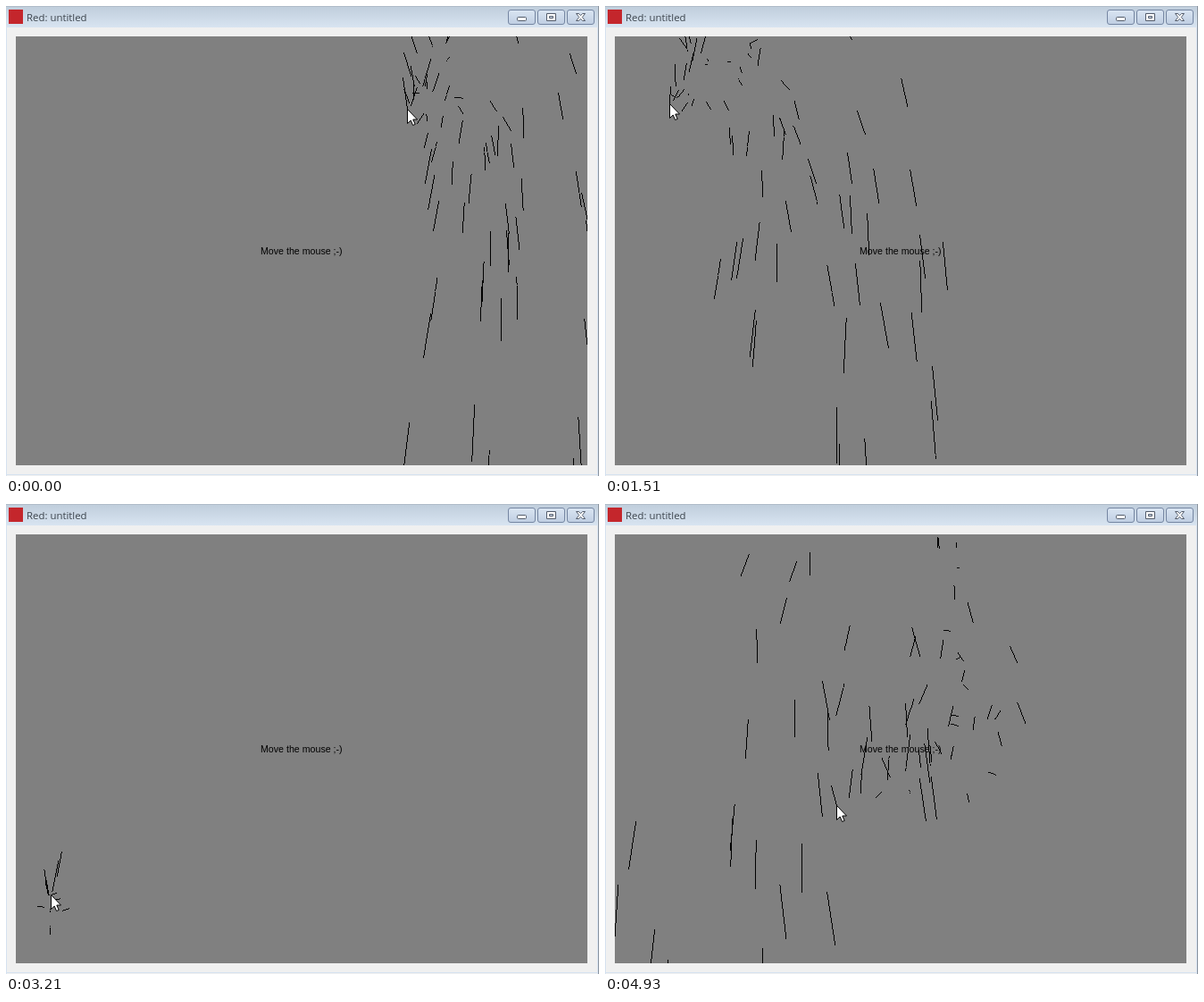
An HTML page with a canvas that plays this animation: 664 px wide and 526 px high, repeating every 5.03 s.

```html
<!DOCTYPE html>
<html lang="en">
<head>
<meta charset="utf-8">
<title>Red: untitled</title>
<style>
html, body { margin: 0; width: 100%; height: 100%; overflow: hidden; background: #f0f0f0; }
#stage { position: absolute; left: 0; top: 0; width: 664px; height: 526px; overflow: hidden; }
svg, canvas { position: absolute; display: block; }
svg { left: 0; top: 0; }
canvas { left: 11px; top: 34px; background: #808080; }
.title { font: 11.4px "Open Sans", "Noto Sans", sans-serif; fill: #3c444d; }
.hint { font: 10.65px "Liberation Sans", Arial, sans-serif; fill: #000; }
</style>
</head>
<body>
<div id="stage">
  <svg width="664" height="526">
    <defs>
      <linearGradient id="bar" x1="0" y1="0" x2="0" y2="1">
        <stop offset="0" stop-color="#bfcddb"/>
        <stop offset="1" stop-color="#d8e4f1"/>
      </linearGradient>
      <linearGradient id="btn" x1="0" y1="0" x2="0" y2="1">
        <stop offset="0" stop-color="#dae5f2"/>
        <stop offset="1" stop-color="#bfcee2"/>
      </linearGradient>
      <rect id="box" x=".5" y=".5" width="30" height="16" rx="2.5" fill="url(#btn)" stroke="#7586a2"/>
    </defs>
    <rect width="664" height="526" fill="#f0f0f0"/>
    <rect width="664" height="24" fill="url(#bar)"/>
    <path d="M0 .5H664" stroke="#b0bcc9"/>
    <path d="M.5 24V526M662.5 24V526M0 524.5H664" stroke="#d5e2f0"/>
    <path d="M663.5 0V526" stroke="#8c959f"/>
    <rect x="3" y="4" width="16" height="16" fill="#c4262c"/>
    <text class="title" x="23" y="17">Red: untitled</text>
    <use href="#box" x="562" y="4"/>
    <use href="#box" x="595" y="4"/>
    <use href="#box" x="628" y="4"/>
    <g fill="#fff" stroke="#535c6b">
      <rect x="572.5" y="12.5" width="10" height="4" rx="1"/>
      <path fill-rule="evenodd" d="M605.5 8.5H615.5V16.5H605.5ZM608.5 11.5V13.5H612.5V11.5Z"/>
      <path d="M638.5 8.5H641.5L643.5 10.7 645.5 8.5H648.5L645.3 12.5 648.5 16.5H645.5L643.5 14.3 641.5 16.5H638.5L641.7 12.5Z"/>
    </g>
  </svg>
  <canvas id="view" width="640" height="480"></canvas>
  <svg width="664" height="526">
    <text class="hint" x="285" y="278">Move the mouse ;-)</text>
    <path id="arrow" d="M.5 .5V16.5L4.2 13 6.6 18.5 9.2 17.4 6.8 12H11.5Z" fill="#fff" stroke="#000"/>
  </svg>
</div>
<script>
const LOOP = 5030, STEP = 142, LEAD = 72; // ms
const LAST = 35;       // last step of the loop
const START = -9;      // the fountain is already running at step 0
const RATE = 12;       // sparks per step
const TICKS = 2.58;    // units of speed per step
const GRAVITY = 5.4;   // px per tick squared

// key points of the pointer: step, x, y
const path = [
  [-9, 574, 128], [-4, 556, 122], [0, 449, 115], [4, 333, 101],
  [8, 177, 111], [12, 48, 140], [15, 47, 447], [18, 49, 496],
  [21, 50, 508], [23, 50, 437], [28, 68, 211], [30, 168, 122],
  [32, 365, 108], [33, 415, 185], [34, 408, 310], [35, 259, 337]
];

// smooth curve through the key points
function pointer(s) {
  let i = 0;
  while (i < path.length - 2 && path[i + 1][0] <= s) i++;
  const a = path[i], b = path[i + 1];
  const before = path[i - 1] || a, after = path[i + 2] || b;
  const len = b[0] - a[0], k = (s - a[0]) / len, k2 = k * k, k3 = k2 * k;
  return [1, 2].map(c => {
    const ma = (b[c] - before[c]) / (b[0] - before[0]) * len;
    const mb = (after[c] - a[c]) / (after[0] - a[0]) * len;
    return a[c] * (2 * k3 - 3 * k2 + 1) + ma * (k3 - 2 * k2 + k)
      + b[c] * (3 * k2 - 2 * k3) + mb * (k3 - k2);
  });
}

let seed = 20;
function random() {
  seed = (seed * 1664525 + 1013904223) >>> 0;
  return seed / 4294967296;
}

const resting = s => s > 17.8 && s < 22.1;

const sparks = [];
for (let i = START * RATE; i <= LAST * RATE; i++) {
  const born = i / RATE;
  if (resting(born)) continue;
  const [x, y] = pointer(born);
  const vx = Math.floor(random() * 19) - 9;
  const vy = -Math.floor(random() * 36);
  sparks.push({ born, x: x - 11, y: y - 34, vx, vy });
}

const ctx = document.getElementById("view").getContext("2d");
const arrow = document.getElementById("arrow");

// crisp one-pixel line
function line(x, y, dx, dy) {
  const n = Math.max(1, Math.round(Math.max(Math.abs(dx), Math.abs(dy))));
  for (let i = 0; i <= n; i++) {
    ctx.fillRect(Math.round(x + dx * i / n), Math.round(y + dy * i / n), 1, 1);
  }
}

function draw(step) {
  ctx.clearRect(0, 0, 640, 480);
  for (const s of sparks) {
    if (s.born > step) break;
    const n = (step - s.born) * TICKS;
    const y = s.y + s.vy * n + GRAVITY * n * n / 2;
    if (y < 480) line(s.x + s.vx * n, y, s.vx, s.vy + GRAVITY * n);
  }
  const [px, py] = pointer(step).map(Math.round);
  arrow.setAttribute("transform", `translate(${px} ${py})`);
}

const begin = performance.now();
let shown = -1;
function tick() {
  const t = (performance.now() - begin) % LOOP;
  const step = Math.min(LAST, Math.floor((t + LEAD) / STEP));
  if (step !== shown) draw(shown = step);
  requestAnimationFrame(tick);
}
tick();
</script>
</body>
</html>
```
